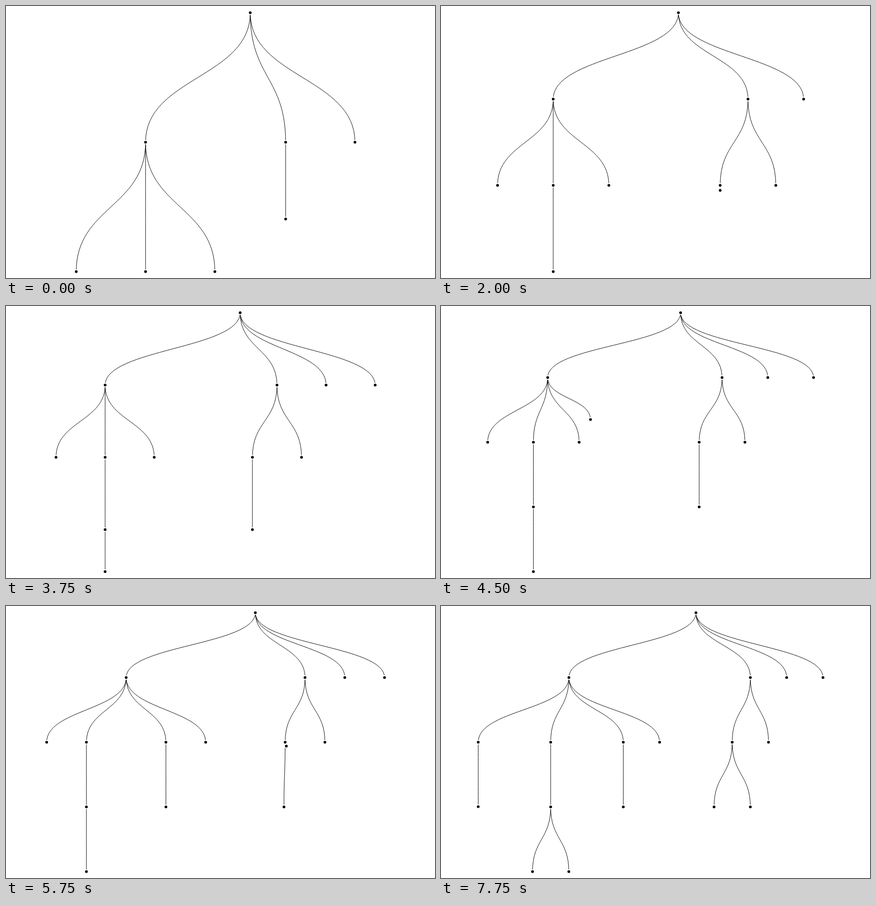
Recreate the animation shown at these times as an HTML page with a canvas. Size 940 by 596 pixels, loop 8000 ms.

```html
<!DOCTYPE html>
<html lang="en">
<head>
<meta charset="utf-8">
<title>Growing tree</title>
<style>
  html, body { margin: 0; width: 100%; height: 100%; overflow: hidden; background: #fff; }
  canvas { display: block; }
</style>
</head>
<body>
<canvas width="940" height="596"></canvas>
<script>
const ctx = document.querySelector('canvas').getContext('2d');

const LOOP = 8000, STEP = 250, DURATION = 750;
const AREA = { x: 2, y: 14.8, width: 914.5, height: 567.3 };

// Parent of each node, in order of arrival.
const parents = [-1, 0, 0, 0, 1, 1, 1, 2, 5, 2, 7, 0, 8, 1, 6, 7, 8, 4];
const depths = [];
parents.forEach((p, id) => { depths[id] = p < 0 ? 0 : depths[p] + 1; });

// Each start time brings one more node to the seven already there.
const starts = [-400, 333, 1079, 1817, 2583, 3333, 4083, 4825, 5565, 6320, 7075];
const firstCount = parents.length - starts.length;

// Tidy tree of the first `count` nodes: siblings 1 apart, cousins 2 apart.
function layout(count) {
  const xs = Array(count).fill(0);

  function arrange(id) {
    const family = [id], rightEdge = [];
    const kids = [...xs.keys()].filter(k => parents[k] === id);
    kids.forEach((kid, i) => {
      const group = arrange(kid);
      const shift = i === 0 ? 0 : Math.max(...group.map(m =>
        (rightEdge[depths[m]] ?? -Infinity) + (depths[m] === depths[kid] ? 1 : 2) - xs[m]));
      for (const m of group) {
        xs[m] += shift;
        rightEdge[depths[m]] = Math.max(rightEdge[depths[m]] ?? -Infinity, xs[m]);
      }
      family.push(...group);
    });
    if (kids.length) xs[id] = (xs[kids[0]] + xs[kids.at(-1)]) / 2;
    return family;
  }

  arrange(0);
  const left = Math.min(...xs) - 1, right = Math.max(...xs) + 1;
  const levels = Math.max(...depths.slice(0, count));
  return xs.map((x, id) => ({
    x: AREA.x + (x - left) / (right - left) * AREA.width,
    y: AREA.y + depths[id] / levels * AREA.height
  }));
}

const layouts = [layout(firstCount), ...starts.map((_, i) => layout(firstCount + i + 1))];

const easeCubic = p => p < 0.5 ? 4 * p ** 3 : 1 - 4 * (1 - p) ** 3;
const mix = (a, b, k) => a + (b - a) * k;

function positions(time) {
  const current = starts.findLastIndex(start => start <= time);
  const k = easeCubic(Math.min(1, (time - starts[current]) / DURATION));
  const before = layouts[current], after = layouts[current + 1];
  return after.map((to, id) => {
    const from = before[id] ?? before[parents[id]];
    return { x: mix(from.x, to.x, k), y: mix(from.y, to.y, k) };
  });
}

function drawLink(a, b) {
  const midY = (a.y + b.y) / 2;
  ctx.beginPath();
  ctx.moveTo(a.x, a.y);
  ctx.bezierCurveTo(a.x, midY, b.x, midY, b.x, b.y);
  ctx.stroke();
}

function drawDisc({ x, y }, radius, color) {
  ctx.fillStyle = color;
  ctx.beginPath();
  ctx.arc(x, y, radius, 0, 2 * Math.PI);
  ctx.fill();
}

function render() {
  const time = Math.floor(performance.now() % LOOP / STEP) * STEP;
  const nodes = positions(time);
  ctx.fillStyle = '#fff';
  ctx.fillRect(0, 0, 940, 596);
  ctx.strokeStyle = '#000';
  ctx.lineWidth = 1;
  nodes.forEach((node, id) => { if (id) drawLink(nodes[parents[id]], node); });
  for (const node of nodes) {
    drawDisc(node, 5, '#fff');
    drawDisc(node, 3, '#000');
  }
  requestAnimationFrame(render);
}
render();
</script>
</body>
</html>
```
